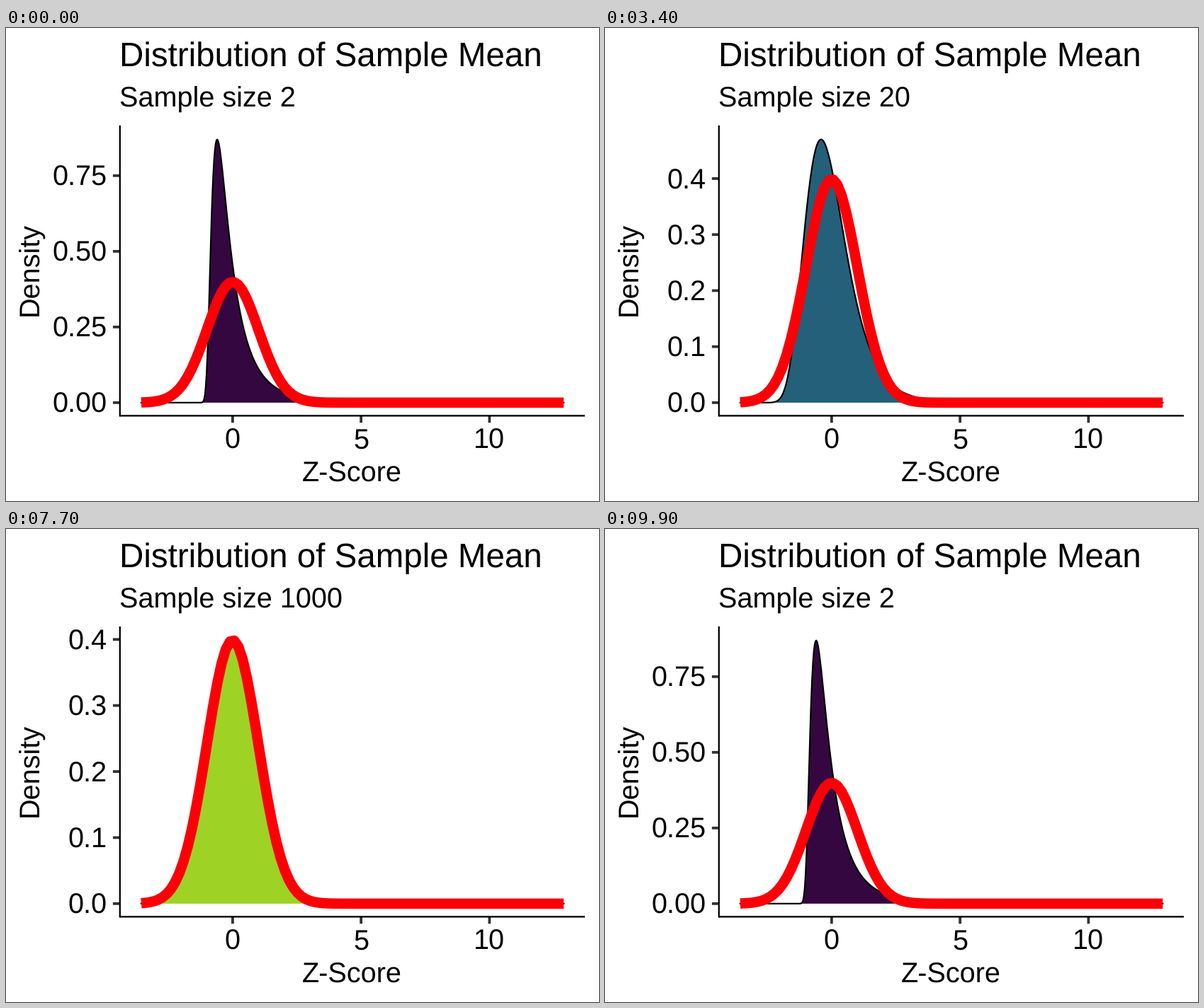
Animation, 837 px wide and 669 px high, one loop 10000 ms. Source, as a matplotlib script:

```python
import numpy as np
import matplotlib.pyplot as plt
from matplotlib.animation import FuncAnimation

W, H, DPI = 837, 669, 64
PT = 72 / DPI                      # points per pixel
FRAMES, INTERVAL = 100, 100

# Panel geometry in pixels
LEFT, RIGHT, TOP, BOTTOM = 160.8, 817, 139, 548.4
ZERO_X, UNIT_X = 319.9, 36.25
BASE_Y, PEAK_H = 529.9, 372.3
CURVE_X = (190.9, 787.2)

SIZES = (2, 5, 10, 20, 25, 30, 100, 1000, 10000)
# Last still frame before each transition, first still frame after it
LEAVE = (3, 15, 27, 38, 49, 59, 70, 81, 92)
ARRIVE = (11, 23, 34, 45, 55, 66, 77, 88, 99)

plt.rcParams["font.family"] = "Liberation Sans"
plt.rcParams["text.hinting"] = "none"

px = np.linspace(*CURVE_X, 512)
z = (px - ZERO_X) / UNIT_X
bell_px = np.linspace(*CURVE_X, 101)
bell = np.exp(-((bell_px - ZERO_X) / UNIT_X) ** 2 / 2) / np.sqrt(2 * np.pi)


def mean_density(n):
    """Smoothed density of the standardised mean of n lognormal values."""
    u = np.linspace(-6, 6, 4001)
    weight = np.exp(-u * u / 2)
    weight /= weight.sum()
    value = (np.exp(u) - np.exp(0.5)) / np.sqrt(np.e * (np.e - 1))
    dt = 0.1
    t = np.arange(0, 60, dt)
    width = 0.14 * (1 - 0.66 / np.sqrt(n))
    char = (np.exp(1j * np.outer(t / np.sqrt(n), value)) @ weight) ** n
    char *= np.exp(-(width * t) ** 2 / 2)
    char[0] /= 2
    return ((np.exp(-1j * np.outer(z, t)) @ char).real * dt / np.pi).clip(0)


def tone(color):
    """Map a plain screen colour to a wider-gamut, gamma 1.8 display."""
    c = np.array(color[:3])
    linear = np.where(c > 0.04045, ((c + 0.055) / 1.055) ** 2.4, c / 12.92)
    mix = np.array([[0.972, 0.025, 0.003],
                    [0.000, 0.985, 0.015],
                    [0.0015, 0.001, 0.972]])
    return (mix @ linear).clip(0, 1) ** (1 / 1.8)


DENSITIES = [mean_density(n) for n in SIZES]
FILLS = plt.get_cmap("viridis")(np.linspace(0, 1, len(SIZES)))


def state_at(frame):
    """Return (from index, to index, progress)."""
    for i, (a, b) in enumerate(zip(LEAVE, ARRIVE)):
        if frame < b:
            return i, (i + 1) % len(SIZES), max(0, frame - a) / (b - a)
    return 0, 0, 0


def y_breaks(top):
    """Best-scoring tick step for a padded axis that starts at zero."""
    lo, hi = -0.05 * top, 1.05 * top
    best = (-99, 1)
    for i, q in enumerate((1, 5, 2, 2.5, 4, 3)):
        for step in (q / 100, q / 10, q):
            for end in step * np.arange(1, 9):
                cover = 1 - 0.5 * ((hi - end) ** 2 + lo ** 2) / (0.1 * (hi - lo)) ** 2
                ratio = (max(end, hi) - lo) / step / 4
                spread = 2 - max(ratio, 1 / ratio)
                score = 0.25 * (1 - i / 5) + 0.2 * cover + 0.5 * spread
                best = max(best, (score, step))
    step = best[1]
    digits = 1 if abs(step * 10 - round(step * 10)) < 1e-6 else 2
    return np.arange(0, hi, step), digits


fig = plt.figure(figsize=(W / DPI, H / DPI), dpi=DPI, facecolor="white")
ax = fig.add_axes([0, 0, 1, 1])
ax.set_xlim(0, W)
ax.set_ylim(H, 0)
ax.axis("off")


def label(x, y, text, size=39.6, **kw):
    return ax.text(x, y, text, fontsize=size * PT, color="black",
                   va="baseline", **kw)


def line(x, y, width, color="black", cap="butt", **kw):
    return ax.plot(x, y, color=color, lw=width * PT, solid_capstyle=cap,
                   solid_joinstyle="round", snap=False, **kw)[0]


area, = ax.fill([0, 0, 0], [0, 0, 0], lw=0, zorder=1)
outline = line(px, px, 2.2, cap="projecting", zorder=2)
red = line(bell_px, bell_px, 14.6, tone((1, 0, 0)), zorder=3)

line([LEFT, LEFT], [TOP, BOTTOM], 2.3, cap="projecting", zorder=5)
line([LEFT, RIGHT], [BOTTOM, BOTTOM], 2.3, zorder=5)
for value in (0, 5, 10):
    x = ZERO_X + UNIT_X * value
    line([x, x], [BOTTOM, BOTTOM + 9.9], 3.8, "#333333", zorder=4)
    label(x, 595, str(value), ha="center")

label(160.5, 54, "Distribution of Sample Mean", 47.5)
subtitle = label(160.5, 112, "")
label(488, 642, "Z-Score", ha="center")
label(45.5, 340.5, "Density", ha="center", rotation=90, rotation_mode="anchor")

ticks = [(line([LEFT - 9.9, LEFT], [0, 0], 3.8, "#333333", zorder=4),
          label(143, 0, "", ha="right")) for _ in range(10)]


def draw(frame):
    a, b, t = state_at(frame)
    density = DENSITIES[a] * (1 - t) + DENSITIES[b] * t
    top = max(density.max(), bell.max())
    scale = PEAK_H / top

    y = BASE_Y - density * scale
    outline.set_ydata(y)
    area.set_xy(np.column_stack([np.r_[px[0], px, px[-1]],
                                 np.r_[BASE_Y, y, BASE_Y]]))
    area.set_facecolor(tone(FILLS[a] * (1 - t) + FILLS[b] * t))
    red.set_ydata(BASE_Y - bell * scale)
    subtitle.set_text(f"Sample size {SIZES[b if t >= 0.5 else a]}")

    values, digits = y_breaks(top)
    for i, (mark, text) in enumerate(ticks):
        shown = i < len(values)
        mark.set_visible(shown)
        text.set_visible(shown)
        if shown:
            pos = BASE_Y - values[i] * scale
            mark.set_ydata([pos, pos])
            text.set_y(pos + 14.2)
            text.set_text(f"{values[i]:.{digits}f}")
    return []


anim = FuncAnimation(fig, draw, frames=FRAMES, interval=INTERVAL,
                     init_func=lambda: draw(0), repeat=True, repeat_delay=0)
plt.show()
```
